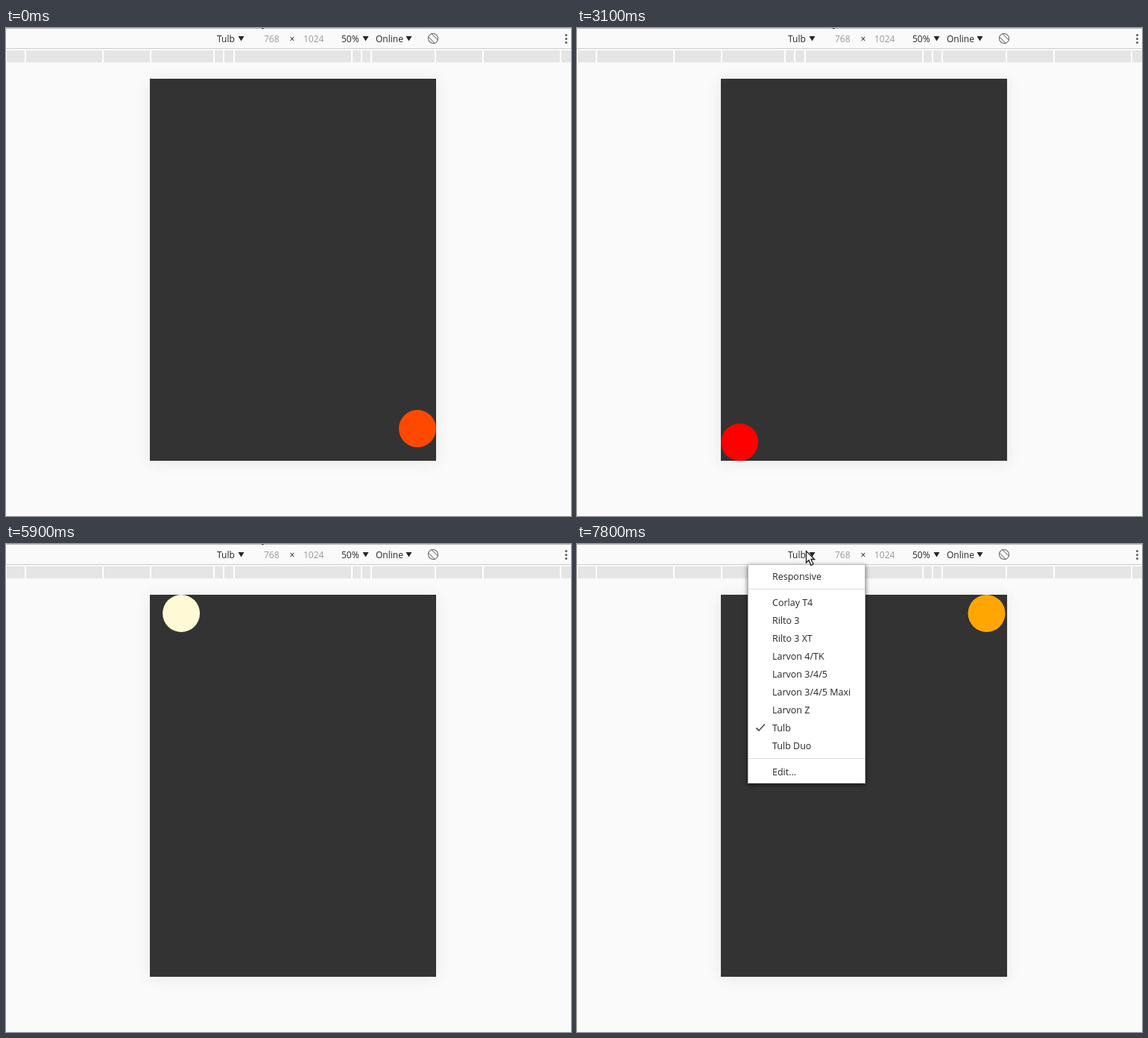
Animation of 758x654 px, one loop 8000 ms. Source, as an HTML page with a canvas:

```html
<!DOCTYPE html>
<html lang="en">
<head>
<meta charset="utf-8">
<title>Ball around a device viewport</title>
<style>
  html, body { margin: 0; width: 100%; height: 100%; overflow: hidden; background: #fafafa; }
  canvas { display: block; }
</style>
</head>
<body>
<canvas id="stage" width="758" height="654"></canvas>
<script>
const ctx = document.getElementById('stage').getContext('2d');
const W = 758, H = 654;
const FONT = '"Open Sans", "Noto Sans", sans-serif';
const INK = '#262626', MUTED = '#999', ICON = '#646464';

const LOOP = 8000;
const SIDE_MS = 2443;      // one side of the lap
const LAP_OFFSET = 1694;   // lap time already run at the start
const MENU_AT = 7600;

const VIEW = { x: 193, y: 68, w: 384, h: 512 };
const MIDDLE = VIEW.x + VIEW.w / 2;
const RADIUS = 25;
const BREAKPOINTS = [320, 375, 425, 768, 1024, 1440];

const left = VIEW.x + RADIUS, right = VIEW.x + VIEW.w - RADIUS;
const top_ = VIEW.y + RADIUS, bottom = VIEW.y + VIEW.h - RADIUS;
const CORNERS = [
  { x: right, y: top_, rgb: [255, 165, 0] },
  { x: right, y: bottom, rgb: [255, 69, 0] },
  { x: left, y: bottom, rgb: [255, 0, 0] },
  { x: left, y: top_, rgb: [255, 255, 224] }
];
const MENU = [
  ['Responsive'],
  ['Corlay T4', 'Rilto 3', 'Rilto 3 XT', 'Larvon 4/TK', 'Larvon 3/4/5',
   'Larvon 3/4/5 Maxi', 'Larvon Z', 'Tulb', 'Tulb Duo'],
  ['Edit…']
];
const CHOSEN = 'Tulb';

const mix = (a, b, k) => a + (b - a) * k;
const clamp = k => Math.min(1, Math.max(0, k));

// cubic-bezier(.25, .1, .25, 1)
function ease(p) {
  const bez = (a, b, u) => 3 * a * u * (1 - u) ** 2 + 3 * b * u * u * (1 - u) + u ** 3;
  let lo = 0, hi = 1;
  for (let i = 0; i < 24; i++) {
    const mid = (lo + hi) / 2;
    if (bez(0.25, 0.25, mid) < p) lo = mid; else hi = mid;
  }
  return bez(0.1, 1, lo);
}

const STALLS = [[200, 500], [2600, 2900]];
function heldTime(t) {
  const stall = STALLS.find(([from, to]) => t >= from && t < to);
  if (stall) return stall[0];
  const step = t < 5000 ? 100 : 200;
  return Math.floor(t / step) * step;
}

function rect(x, y, w, h, color) {
  ctx.fillStyle = color;
  ctx.fillRect(x, y, w, h);
}

function disc(x, y, r, color) {
  ctx.fillStyle = color;
  ctx.beginPath();
  ctx.arc(x, y, r, 0, Math.PI * 2);
  ctx.fill();
}

function poly(points) {
  ctx.beginPath();
  points.forEach(([x, y]) => ctx.lineTo(x, y));
}

function text(str, x, y, size = 12, color = INK) {
  ctx.font = `${size}px ${FONT}`;
  ctx.fillStyle = color;
  ctx.fillText(str, x, y);
}

function withShadow(color, blur, dy, draw) {
  ctx.save();
  ctx.shadowColor = color;
  ctx.shadowBlur = blur;
  ctx.shadowOffsetY = dy;
  draw();
  ctx.restore();
}

function rotateIcon(x, y) {
  ctx.save();
  ctx.translate(x, y);
  ctx.rotate(-Math.PI / 4);
  ctx.strokeStyle = ICON;
  ctx.lineWidth = 1;
  ctx.beginPath();
  ctx.roundRect(-3, -6.5, 6, 13, 1);
  ctx.stroke();
  for (const side of [0, Math.PI]) {
    ctx.beginPath();
    ctx.arc(0, 0, 6.5, side - 1.1, side + 1.1);
    ctx.stroke();
  }
  ctx.restore();
}

function dropdown(label, x, arrowX) {
  text(label, x, 18.5);
  poly([[arrowX - 4, 11], [arrowX + 4, 11], [arrowX, 17.5]]);
  ctx.fill();
}

function toolbar() {
  rect(0, 0, W, 1, '#b8b8b8');
  rect(0, 27, W, 1, '#ccc');
  dropdown(CHOSEN, 283, 315.5);
  dropdown('50%', 450, 482.5);
  dropdown('Online', 496, 540.5);
  text('768', 346, 18.5, 12, MUTED);
  text('×', 380.5, 18.5);
  text('1024', 399, 18.5, 12, MUTED);
  rotateIcon(573, 14);
  for (let i = 0; i < 3; i++) disc(751.5, 9.5 + i * 5, 1.6, ICON);
}

// Bars nest around the middle; the page is shown at half size.
function ruler() {
  rect(0, 30, W, 16, '#e5e5e5');
  rect(0, 30, 1, 16, '#fff');
  for (const width of BREAKPOINTS) {
    const half = width / 4;
    rect(Math.floor(MIDDLE - half), 30, 2, 16, '#fff');
    rect(Math.floor(MIDDLE + half) - 2, 30, 2, 16, '#fff');
  }
}

function ball(t) {
  // The clock runs a little ahead until the first stall is over.
  const clock = t < 500 ? t + 140 : t;
  const phase = (clock + LAP_OFFSET) / SIDE_MS;
  const side = Math.floor(phase);
  const a = CORNERS[side % 4], b = CORNERS[(side + 1) % 4];
  const k = ease(phase - side);
  const rgb = a.rgb.map((c, i) => Math.round(mix(c, b.rgb[i], k)));
  disc(mix(a.x, b.x, k), mix(a.y, b.y, k), RADIUS, `rgb(${rgb})`);
}

function checkMark(y) {
  ctx.strokeStyle = '#555';
  ctx.lineWidth = 1.8;
  poly([[240.5, y + 0.5], [244, y + 4], [252, y - 4.5]]);
  ctx.stroke();
}

function menu() {
  withShadow('rgba(0,0,0,.6)', 6, 2, () => rect(229, 27, 158, 294, '#bcbcbc'));
  rect(230, 28, 156, 292, '#fff');
  let y = 43;
  MENU.forEach((group, i) => {
    if (i > 0) {
      rect(230, y - 7, 156, 1, '#dcdcdc');
      y += 11;
    }
    for (const label of group) {
      text(label, 262, y + 4.7, 12.5);
      if (label === CHOSEN) checkMark(y);
      y += 24;
    }
  });
}

function pointer(t) {
  const k = clamp((t - 6000) / 800);
  ctx.save();
  ctx.translate(mix(337, 307, 1 - (1 - k) ** 3), mix(-19, 9, k ** 2.5));
  poly([[0.5, 0.5], [0.5, 16], [4, 12.7], [7, 19.5], [10, 18], [7, 11.5], [11.7, 11.5]]);
  ctx.closePath();
  ctx.fillStyle = '#fff';
  ctx.fill();
  ctx.strokeStyle = '#1a1a1a';
  ctx.lineWidth = 1.3;
  ctx.stroke();
  ctx.restore();
}

function draw(t) {
  rect(0, 0, W, H, '#fafafa');
  withShadow('rgba(0,0,0,.08)', 20, 2, () => rect(VIEW.x, VIEW.y, VIEW.w, VIEW.h, '#333'));
  ball(t);
  toolbar();
  ruler();
  if (t >= MENU_AT) menu();
  pointer(t);
}

const start = performance.now();
function frame() {
  draw(heldTime((performance.now() - start) % LOOP));
  requestAnimationFrame(frame);
}
frame();
</script>
</body>
</html>
```
